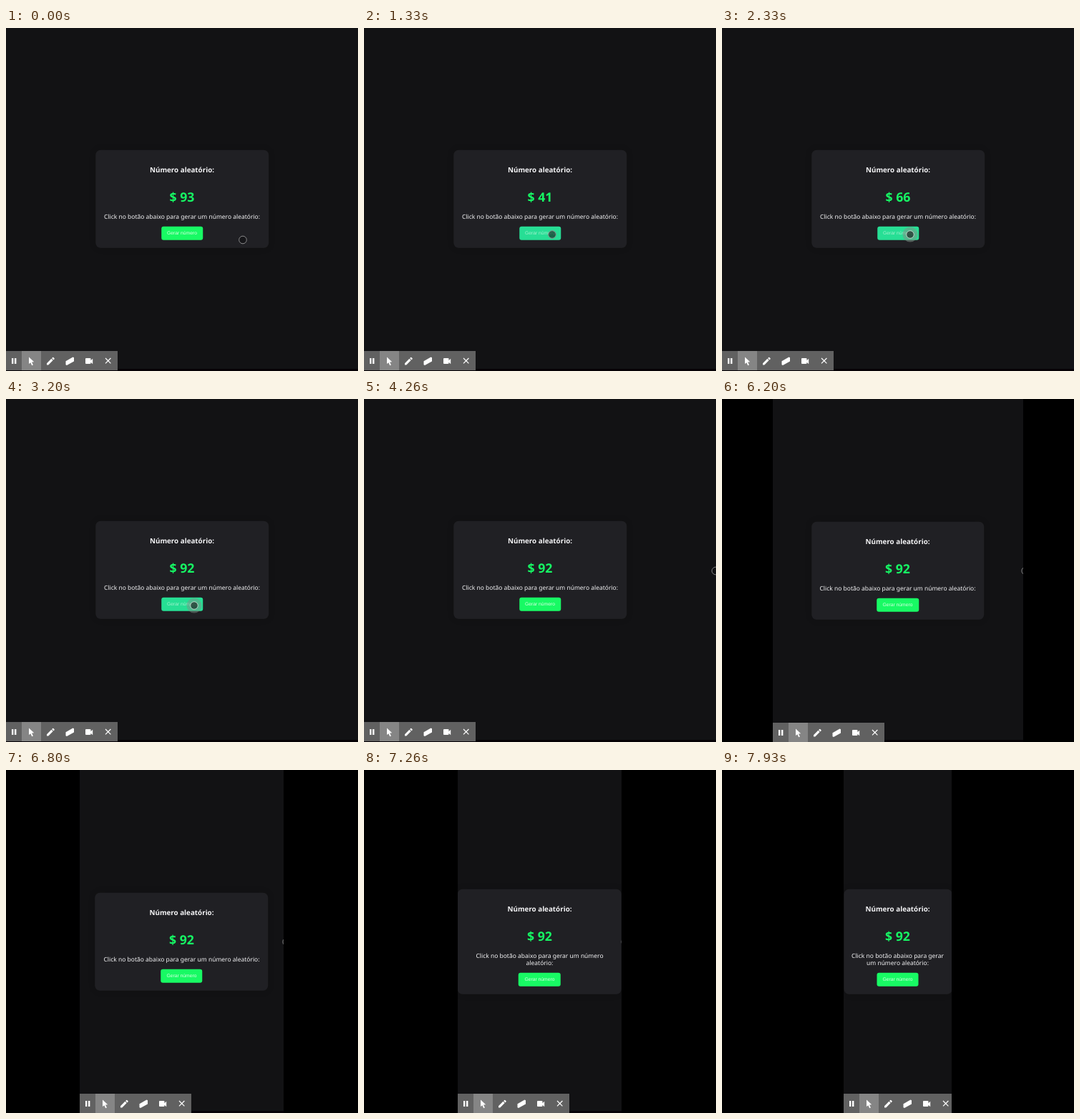
These frames come from a looping animation (492x480 px, 8000 ms). An HTML page:

```html
<!DOCTYPE html>
<html lang="pt">
<head>
<meta charset="utf-8">
<title>Número aleatório</title>
<style>
  html, body { margin: 0; width: 100%; height: 100%; overflow: hidden; background: #000; }
  #stage { position: relative; width: 492px; height: 480px; overflow: hidden; }
  #page {
    position: absolute; top: 0; height: 480px; overflow: hidden; background: #121214;
    font-family: "Noto Sans", "Open Sans", sans-serif; color: #f4f4f6;
    text-align: center; text-rendering: geometricPrecision;
  }
  #page::after {
    content: ""; position: absolute; left: 0; right: 0; bottom: 0; height: 3.5px; background: #060206;
  }
  #card {
    position: absolute; left: 50%; top: 240px; box-sizing: border-box;
    width: 241.5px; max-width: 100%; padding: 20px 10px 10.5px;
    transform: translate(-50%, -50%);
    background: #202024; border-radius: 7px; box-shadow: 0 0 10px rgba(0, 0, 0, .15);
  }
  h1, p { margin: 0; }
  h1 { font-size: 9.82px; line-height: 15px; font-weight: 700; }
  #number { margin-top: 20px; font-size: 17.7px; line-height: 22px; font-weight: 700; color: #16f864; }
  #hint { margin-top: 11.5px; font-size: 8.47px; line-height: 10px; }
  #button {
    width: 58.5px; height: 19px; margin: 8.5px auto 0; border-radius: 3px;
    font: 6.75px/19px "Liberation Sans", Arial, sans-serif;
  }
  #toolbar { position: absolute; left: 0; top: 453px; z-index: 1; }
  #cursor { position: absolute; left: 0; top: 0; z-index: 2; overflow: visible; }
</style>
</head>
<body>
<div id="stage">
  <div id="page">
    <div id="card">
      <h1>Número aleatório:</h1>
      <p id="number"></p>
      <p id="hint">Click no botão abaixo para gerar um número aleatório:</p>
      <div id="button">Gerar número</div>
    </div>
    <svg id="toolbar" width="156" height="27" fill="#fff">
      <path fill="#616161" d="M0 0h156v27H0z"/>
      <path fill="#858585" d="M22 0h27v27H22z"/>
      <path d="M8 10h2.4v8H8zM12 10h2.4v8H12z"/>
      <path d="M32 8.5v9.6l2.3-1.9 1.9 4 1.7-.8-1.9-3.9 3.2-.3z"/>
      <path d="M57 17.2l6.4-6.4 2.3 2.3-6.4 6.4H57zM64.1 10.1l1.2-1.2q.5-.4 1 0l1.3 1.3q.4.5 0 1l-1.2 1.2z"/>
      <path d="M83.5 14.2L93.5 8.5l1.5.8v5.2L85 20l-1.5-.8z"/>
      <path d="M111 11q0-1 1-1h5.500q1 0 1 1v2.200l2.700-2.500v7.600l-2.700-2.500V17q0 1-1 1H112q-1 0-1-1z"/>
      <path d="M139 10l7.400 7.400M146.400 10L139 17.400" stroke="#fff" stroke-width="1.200"/>
    </svg>
    <svg id="cursor" width="1" height="1">
      <circle id="halo" r="10.5" fill="#7d9187"/>
      <circle id="ring" r="5.3" fill="rgba(16,16,18,.6)" stroke="#8a8a8a"/>
    </svg>
  </div>
</div>
<script>
const $ = id => document.getElementById(id);
const LOOP = 8000;

// Tracks are lists of [time, value] joined by straight lines.
const margin = [[4930, 0], [5460, 27], [5800, 39], [6200, 70.5], [6660, 99],
  [6730, 99], [7260, 131], [7600, 144], [7930, 170]];
const cursorX = [[130, 331], [400, 284], [660, 263], [3460, 263], [3730, 315], [4000, 430], [4260, 491.5]];
const cursorY = [[130, 296.5], [400, 292], [660, 289], [3460, 289], [3730, 277], [4000, 253], [4260, 240.5]];
const hover = [[460, 0], [660, 1], [3530, 0.95], [3730, 0]];
const clicks = [[1000, 41], [2200, 66], [3000, 92]];

function at(track, t) {
  if (t <= track[0][0]) return track[0][1];
  const i = track.findIndex(key => key[0] >= t);
  if (i < 0) return track[track.length - 1][1];
  const [t0, a] = track[i - 1], [t1, b] = track[i];
  return a + (b - a) * (t - t0) / (t1 - t0);
}

const mix = (from, to, k) => `rgb(${from.map((v, i) => Math.round(v + (to[i] - v) * k))})`;

// 15 pictures per second, each starting on a 10 ms tick.
const snap = t => (Math.ceil((Math.floor(t / 10) + 1) * 3 / 20) - 1) * 1000 / 15;

function render(t) {
  const resizing = t >= 4930;
  const left = at(margin, t);
  const width = (resizing ? 491 : 492) - 2 * left;
  $('page').style.left = left + 'px';
  $('page').style.width = width + 'px';
  $('card').style.top = (resizing ? 240 : 239.25) + 'px';
  $('toolbar').style.top = (resizing ? 453.3 : 452.3) + 'px';

  const last = clicks.filter(c => t >= c[0]).pop();
  $('number').textContent = '$ ' + (last ? last[1] : 93);

  const k = at(hover, t);
  $('button').style.background = mix([24, 250, 100], [39, 222, 150], k);
  $('button').style.color = mix([216, 255, 228], [160, 240, 205], k);

  const x = resizing ? width + (t - 4930) / 400 : at(cursorX, t);
  $('cursor').style.transform = `translate(${x}px, ${at(cursorY, t)}px)`;
  const age = last ? t - last[0] : LOOP;
  const pressed = age < 330;
  $('halo').style.opacity = pressed ? 0.55 * Math.min(1, (330 - age) / 150) : 0;
  $('ring').style.stroke = pressed ? '#b9d6c8' : '#8a8a8a';
}

const start = performance.now();
function tick() {
  render(snap((performance.now() - start) % LOOP));
  requestAnimationFrame(tick);
}
tick();
</script>
</body>
</html>
```
